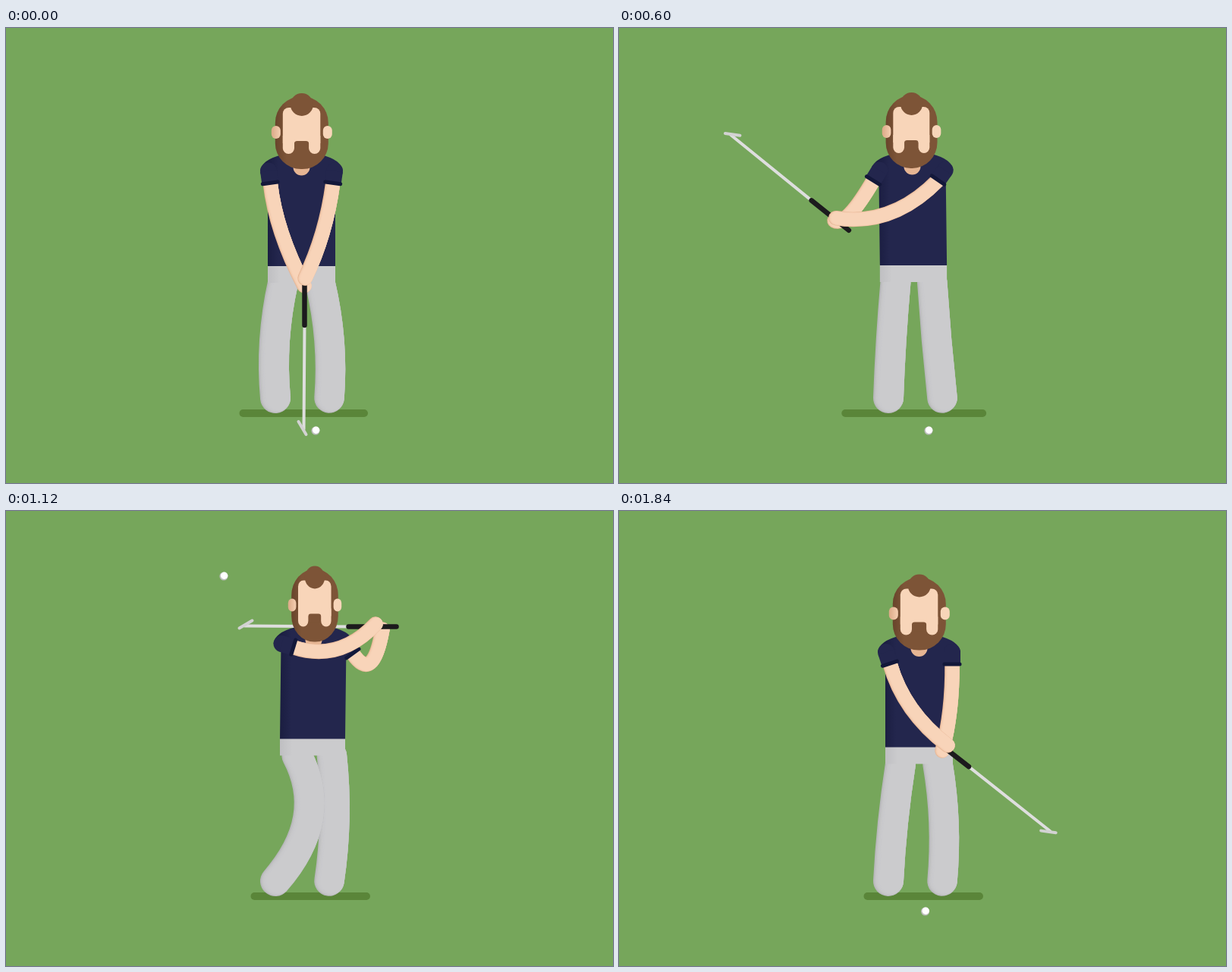
Recreate the animation shown at these times as an HTML page with a canvas. Size 800 px wide and 600 px high, loop 1880 ms.

```html
<!DOCTYPE html>
<html lang="en">
<head>
<meta charset="utf-8">
<title>Golf swing</title>
<style>
html, body { margin: 0; width: 100%; height: 100%; overflow: hidden; background: #76a65b; }
canvas { display: block; width: 100vw; height: 100vh; }
</style>
</head>
<body>
<canvas id="stage" width="800" height="600"></canvas>
<script>
const ctx = document.getElementById('stage').getContext('2d');
const LOOP = 1880, STEP = 40;
const SKIN = '#f8d5b9', SKIN_DARK = '#e6b593', HAIR = '#7d5437', HAIR_DARK = '#68442b';
const NAVY = '#23264d', CUFF = '#13183a', GREY = '#cbcbcd', GREY_DARK = '#b7b7ba';

// Looping monotone cubic through time/value pairs.
function track(...a) {
  const n = a.length / 2;
  const time = i => a[2 * ((i + n) % n)] + LOOP * Math.floor(i / n);
  const val = i => a[2 * ((i + n) % n) + 1];
  const slope = i => (val(i + 1) - val(i)) / (time(i + 1) - time(i));
  const tangent = i => {
    const p = slope(i - 1), q = slope(i);
    return p * q > 0 ? 2 * p * q / (p + q) : 0;
  };
  return t => {
    let i = n - 1;
    while (i > 0 && time(i) > t) i--;
    const h = time(i + 1) - time(i), u = (t - time(i)) / h, w = 1 - u;
    return val(i) * (1 + 2 * u) * w * w + val(i + 1) * u * u * (3 - 2 * u)
      + h * u * w * (tangent(i) * w - tangent(i + 1) * u);
  };
}

function path(...a) {
  const xs = [], ys = [];
  for (let i = 0; i < a.length; i += 3) {
    xs.push(a[i], a[i + 1]);
    ys.push(a[i], a[i + 2]);
  }
  const x = track(...xs), y = track(...ys);
  return t => [x(t), y(t)];
}

// Body
const waistX = track(0, 389.5, 440, 389.5, 720, 387, 880, 389.5, 1120, 404, 1480, 403.5, 1840, 395.5);
const waistY = track(0, 314, 440, 312, 720, 313.5, 880, 311, 1120, 300.5, 1480, 309.5, 1840, 311.5);
const chestX = track(0, 389.5, 440, 389.5, 720, 384.5, 880, 389.5, 1120, 405.5, 1480, 404.5, 1840, 395.5);
const facing = track(0, 1, 440, 1, 720, 0.95, 880, 0.99, 1120, 0.88, 1480, 0.9, 1840, 1);
const kneeL = track(0, 354, 440, 357, 720, 361, 880, 376, 1120, 398, 1480, 403, 1840, 361);
const kneeR = track(0, 426, 440, 420, 720, 418, 880, 427, 1120, 433, 1480, 436, 1840, 428);
const shadowL = track(0, 307.5, 440, 306.5, 720, 285, 880, 310, 1120, 322.5, 1840, 322.5);
const shadowR = track(0, 477, 440, 472, 720, 492, 880, 483, 1120, 480, 1840, 480);

// Arms and club
const sleeveL = track(0, 82, 440, 82, 720, 147, 880, 115, 960, 78, 1120, 17, 1480, 17, 1840, 72);
const sleeveR = track(0, 98, 440, 98, 720, 142, 880, 111, 960, 98, 1120, 54, 1480, 45, 1840, 90);
const elbowL = path(0, 363, 270, 440, 363, 268, 560, 318, 258, 720, 276, 194, 880, 319, 238,
  960, 368, 272, 1000, 422, 250, 1120, 436, 182, 1480, 437, 185, 1680, 420, 215, 1840, 385, 260);
const elbowR = path(0, 417, 270, 440, 417, 268, 560, 370, 258, 720, 330, 187, 880, 361, 238,
  960, 420, 270, 1000, 462, 245, 1120, 480, 200, 1480, 482, 200, 1680, 474, 215, 1840, 436, 262);
const handL = path(0, 393, 340, 440, 393, 338, 560, 297, 291, 720, 262, 135, 880, 260, 252,
  960, 390, 338, 1000, 478, 280, 1040, 500, 195, 1120, 487, 149, 1480, 481, 145, 1680, 478, 203, 1840, 433, 309);
const handR = path(0, 394, 330, 440, 394, 328, 560, 303, 284, 720, 255, 145, 880, 268, 256,
  960, 394, 330, 1000, 472, 286, 1040, 503, 202, 1120, 496, 156, 1480, 488, 157, 1680, 472, 212, 1840, 426, 316);
const clubAngle = track(0, 90, 440, 88.8, 560, 180, 720, 313, 880, 287, 960, 95, 1000, 5,
  1040, -75, 1120, -180, 1480, -188.6, 1680, -95, 1800, 0, 1840, 38);
const gripGap = track(0, 9, 440, 9, 560, 26, 880, 26, 960, 12, 1000, 26, 1840, 26);

const rad = d => d * Math.PI / 180;

function fill(color) {
  ctx.fillStyle = color;
  ctx.fill();
}

function box(x, y, w, h, r, color) {
  ctx.beginPath();
  ctx.roundRect(x, y, w, h, r);
  fill(color);
}

function disc(x, y, r, color) {
  ctx.beginPath();
  ctx.arc(x, y, r, 0, 7);
  fill(color);
}

function line(x0, y0, x1, y1, w, color, cap = 'round') {
  ctx.beginPath();
  ctx.moveTo(x0, y0);
  ctx.lineTo(x1, y1);
  ctx.lineWidth = w;
  ctx.lineCap = cap;
  ctx.strokeStyle = color;
  ctx.stroke();
}

function fade(x0, x1, from, to) {
  const g = ctx.createLinearGradient(x0, 0, x1, 0);
  g.addColorStop(0, from);
  g.addColorStop(1, to);
  return g;
}

// Curved limb through its middle joint, shaded along the left edge.
function limb(a, mid, b, w, dark, light) {
  const cx = 2 * mid[0] - (a[0] + b[0]) / 2, cy = 2 * mid[1] - (a[1] + b[1]) / 2;
  ctx.lineCap = 'round';
  for (let i = 0; i < 7; i++) {
    const s = i * w / 60;
    ctx.beginPath();
    ctx.moveTo(a[0] + s, a[1]);
    ctx.quadraticCurveTo(cx + s, cy, b[0] + s, b[1]);
    ctx.lineWidth = w - 2 * s;
    ctx.strokeStyle = i ? light : dark;
    ctx.globalAlpha = i ? 0.42 : 1;
    ctx.stroke();
  }
  ctx.globalAlpha = 1;
}

function drawLegs(b) {
  const y = b.y + 22, hip = b.w - 20, my = (y + 488) / 2;
  const turn = (1 - b.face) * 20;
  limb([b.x + hip + turn, y], [b.kr, my], [426, 488], 39.5, GREY_DARK, GREY);
  limb([b.x - hip + turn, y], [b.kl, my], [355, 488], 40, GREY_DARK, GREY);
  box(b.x - b.w, b.y - 1, 2 * b.w, 23, 0, fade(b.x - b.w, b.x - b.w + 16, '#bfbfc2', GREY));
}

function drawTorso(b) {
  const top = b.y - 147, l = b.cx - b.w, r = b.cx + b.w;
  ctx.beginPath();
  ctx.moveTo(b.x - b.w, b.y);
  ctx.lineTo(l, b.jy);
  ctx.lineTo(l - 10, b.jy);
  ctx.quadraticCurveTo(l - 8, b.jy - 15, b.cx - 25, top);
  ctx.lineTo(b.cx + 25, top);
  ctx.quadraticCurveTo(r + 8, b.jy - 15, r + 10, b.jy);
  ctx.lineTo(r, b.jy);
  ctx.lineTo(b.x + b.w, b.y);
  fill(fade(l, l + 14, '#1b1e42', NAVY));
  disc(b.cx, b.y - 130.5, 11, SKIN_DARK);
}

function drawHead(b) {
  ctx.save();
  ctx.translate(b.cx + (b.cx - b.x) * 0.8 + 0.3, b.y - 176);
  ctx.scale(b.face, 1);
  box(-35, -48, 70, 96, [35, 35, 34, 34], fade(-35, -20, HAIR_DARK, HAIR));
  box(-25, -33, 49.5, 47, [8, 8, 0, 0], SKIN);
  disc(0, -37, 15, HAIR);
  box(-10, 11, 19.5, 12, [4, 4, 0, 0], HAIR);
  box(-25, 4, 15.2, 24, [0, 0, 7.6, 7.6], SKIN);
  box(9.3, 4, 15.2, 24, [0, 0, 7.6, 7.6], SKIN);
  box(-40, -9, 12, 17, 6, fade(-40, -28, '#dba987', '#f5cfb2'));
  box(28, -9, 12, 17, 6, SKIN);
  ctx.restore();
}

function drawSleeve(a) {
  const { joint: [x, y], cuff: [sx, sy], dir: [dx, dy] } = a;
  disc(x, y, 11, NAVY);
  line(x, y, sx, sy, 22, NAVY, 'butt');
  line(sx - dy * 10, sy + dx * 10, sx + dy * 10, sy - dx * 10, 5, CUFF);
}

function drawArm(a) {
  limb(a.cuff, a.elbow, a.hand, 19.5, SKIN_DARK, SKIN);
}

function drawClub(t, l, r) {
  ctx.save();
  ctx.translate((l[0] + r[0]) / 2, (l[1] + r[1]) / 2);
  ctx.rotate(rad(clubAngle(t)));
  ctx.translate(-gripGap(t), 0);
  line(66, 0, 203, 1, 4, '#dedede');
  line(193, 8, 210, -2, 4, '#d2d2d2');
  line(3, 0, 66, 0, 6.5, '#1c1a1d');
  ctx.restore();
}

function ballAt(t) {
  if (t <= 960) return [408, 531];
  if (t < 1220) {
    const k = (t - 960) / 160;
    const x = t < 1040 ? 408 + (t - 960) * 5 : 803 - (t - 1040) * 6.45;
    return [x, 86 + 445 * (1 - k) ** 2];
  }
  if (t < 1380) {
    const k = (t - 1220) / 160;
    return [-20 + 350 * k, 180 + 351 * k * k];
  }
  const hops = [[1380, 1560, 19], [1560, 1700, 10], [1700, 1800, 5], [1800, 1880, 3]];
  const [from, to, height] = hops.find(h => t < h[1]) || hops[3];
  const k = (t - from) / (to - from);
  return [330 + (t - 1380) * 0.16, 531 - height * 4 * k * (1 - k)];
}

function drawBall(t) {
  const [x, y] = ballAt(t);
  disc(x, y, 5.6, '#bdbdbd');
  disc(x + 0.6, y - 0.7, 4.7, '#fff');
}

function makeArm(t, b, side, angle, elbow, hand) {
  const a = rad(angle(t)), dir = [Math.cos(a), Math.sin(a)];
  const joint = [b.cx + side * (b.w - 1), b.jy];
  const cuff = [joint[0] + dir[0] * 16, joint[1] + dir[1] * 16];
  return { joint, dir, cuff, elbow: elbow(t), hand: hand(t) };
}

function draw(t) {
  ctx.fillStyle = '#76a65b';
  ctx.fillRect(0, 0, 800, 600);
  const face = facing(t), y = waistY(t);
  const b = { x: waistX(t), y, cx: chestX(t), jy: y - 125.5, face, w: 32 + 12.5 * face,
    kl: kneeL(t), kr: kneeR(t) };
  const left = makeArm(t, b, -1, sleeveL, elbowL, handL);
  const right = makeArm(t, b, 1, sleeveR, elbowR, handR);
  const club = () => drawClub(t, left.hand, right.hand);
  const behind = t >= 1080 && t < 1660;
  const rightOnTop = t < 960;

  const sl = shadowL(t);
  box(sl, 503, shadowR(t) - sl, 10, 5, '#5a8539');
  drawLegs(b);
  if (behind) {
    drawArm(right);
    club();
  }
  drawTorso(b);
  drawHead(b);
  if (behind) {
    drawSleeve(right);
    drawArm(left);
    drawSleeve(left);
  } else {
    const [under, over] = rightOnTop ? [left, right] : [right, left];
    drawArm(under);
    drawSleeve(under);
    club();
    drawArm(over);
    drawSleeve(over);
  }
  drawBall(t);
}

const start = performance.now();
function tick() {
  const t = Math.max(0, performance.now() - start) % LOOP;
  draw(Math.floor(t / STEP) * STEP);
  requestAnimationFrame(tick);
}
tick();
</script>
</body>
</html>
```
